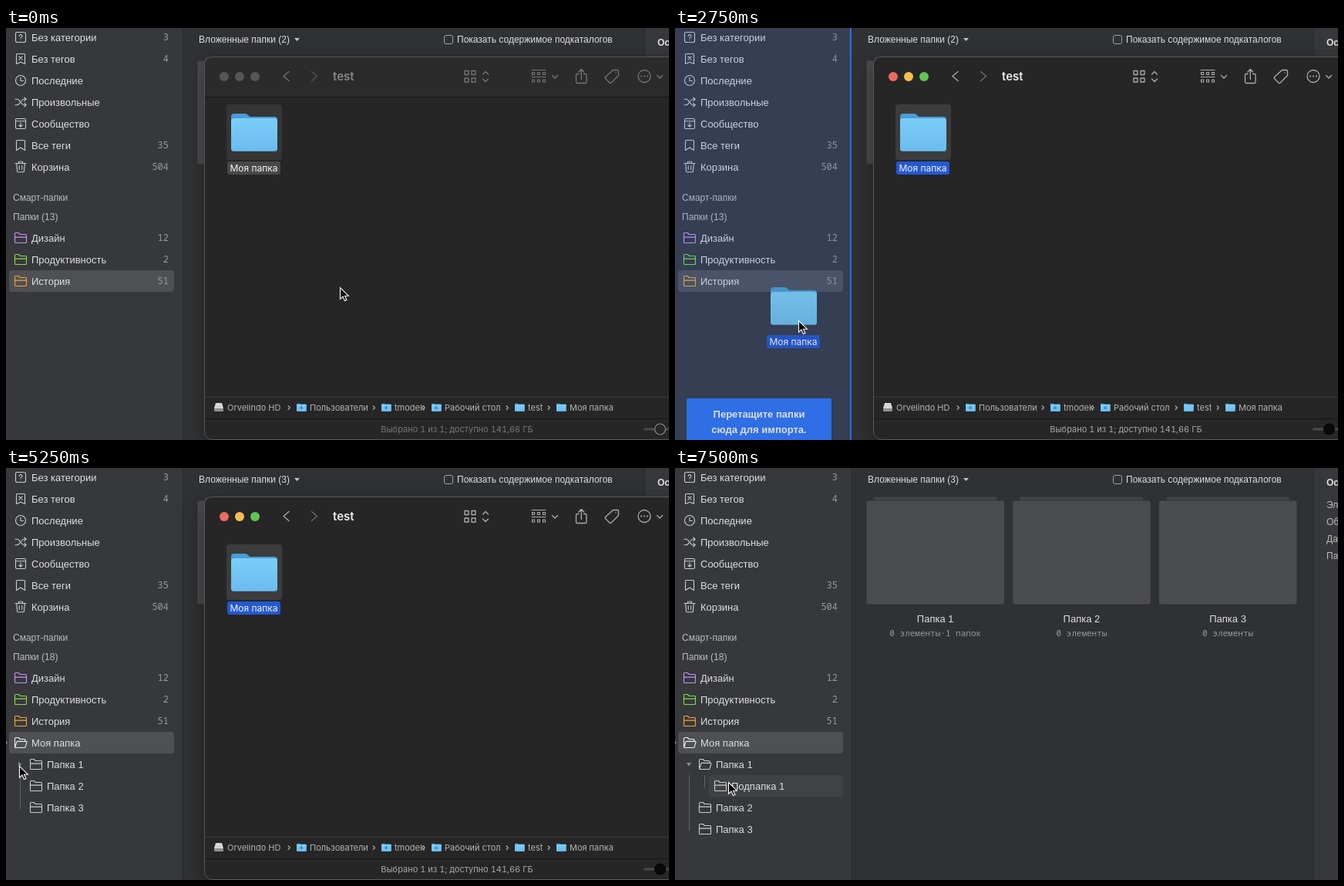
Animation of 860x534 px, one loop 8 s. Source, as an HTML page:

```html
<!DOCTYPE html>
<html lang="ru">
<meta charset="utf-8">
<style>
html, body { margin: 0; width: 100%; height: 100%; overflow: hidden; background: #303133; }
svg { display: block; width: 860px; height: 534px;
  --tool: #adadad; --title: #ececec; --status: #a8a8a8; --label: #2358d1; --square: #3c3c3c;
  --bar: #262626; --rule: #262626; --red: #ed6a5e; --yellow: #f5bf4f; --green: #61c554; --knob: #080808; --ring: #080808; }
svg.idle { --tool: #767676; --title: #858585; --status: #757575; --label: #484848; --square: #353535;
  --bar: #2b2b2b; --rule: #141414; --red: #565656; --yellow: #565656; --green: #565656; --knob: #262626; --ring: #8c8c8c; }
text { font: 13px "Liberation Sans", Arial, sans-serif; fill: #dededf; }
.small { font-size: 12px; }
.dim { fill: #bbbcbe; }
.bold { font-weight: bold; }
.mono { font: 12px "Noto Sans Mono", monospace; fill: #98999c; }
.mid { text-anchor: middle; }
.end { text-anchor: end; }
.mac text { font-family: Inter, sans-serif; font-size: 11px; fill: #b4b4b4; font-variant-numeric: tabular-nums; }
.mac .name { font-size: 12px; fill: #f4f4f4; }
.mac .title { font-size: 15px; font-weight: 600; fill: var(--title); }
.mac .status { fill: var(--status); }
.line { fill: none; stroke: #cbcbcd; stroke-width: 1.1; stroke-linecap: round; stroke-linejoin: round; }
.tool { fill: none; stroke: var(--tool); stroke-width: 1.3; stroke-linecap: round; stroke-linejoin: round; }
#window { filter: drop-shadow(0 10px 14px rgba(0, 0, 0, .4)); }
.idle #window { filter: drop-shadow(0 5px 9px rgba(0, 0, 0, .35)); }
</style>
<svg id="stage" viewBox="0 0 860 534">
  <defs>
    <linearGradient id="front" x2="0" y2="1"><stop stop-color="#7bcdf9"/><stop offset="1" stop-color="#6cbdee"/></linearGradient>
    <g id="macFolder">
      <path d="M0 5a4 4 0 0 1 4-4h14c4 0 4 4 8 4h30a4 4 0 0 1 4 4v12H0z" fill="#4b9cd6"/>
      <rect y="7" width="60" height="43" rx="3.5" fill="#4fa0d6"/>
      <rect y="7" width="60" height="42" rx="3.5" fill="url(#front)"/>
    </g>
    <g id="category"><rect x="-6.5" y="-6.5" width="13" height="13" rx="2"/><path d="M-1.7-1.6a1.8 1.8 0 1 1 2.7 1.5q-1 .5-1 1.4M0 3.2v.1"/></g>
    <g id="untagged"><path d="M-5.5 6.5v-12a1 1 0 0 1 1-1h9a1 1 0 0 1 1 1v12L0 4.2zM-2-3l4 4M2-3l-4 4"/></g>
    <g id="recent"><circle r="6.5"/><path d="M0-3.7V.5H3.4"/></g>
    <g id="random"><path d="M-7-3.7h2.5c3.5 0 5 7.4 9 7.4H7M-7 3.7h2.5c1.5 0 2.6-1.2 3.5-2.6M1-1.2c1-1.5 2-2.5 3.5-2.5H7M4.8-6l2.4 2.3-2.4 2.3M4.8 1.4l2.4 2.3L4.8 6"/></g>
    <g id="community"><rect x="-6.5" y="-6.5" width="13" height="13" rx="1.5"/><path d="M-6.5-3.3h13M0-1.2v5M-2.2 1.8L0 4l2.2-2.2"/></g>
    <g id="tags"><path d="M-5.5 6.5v-12a1 1 0 0 1 1-1h9a1 1 0 0 1 1 1v12L0 3z"/></g>
    <g id="trash"><path d="M-7-4.5H7M-2.5-4.5v-2.3h5v2.3M-5.3-4.5l.8 10a1.2 1.2 0 0 0 1.2 1.2h6.6a1.2 1.2 0 0 0 1.2-1.2l.8-10M-1.8-1.5v5M1.8-1.5v5"/></g>
    <g id="folder"><path d="M-7.5 5.5v-11a1 1 0 0 1 1-1h3.8l2 2h7.2a1 1 0 0 1 1 1v9a1 1 0 0 1-1 1h-13a1 1 0 0 1-1-1zM-7.5-.9h15"/></g>
    <g id="open"><path d="M-7.5 5.5v-11a1 1 0 0 1 1-1h3.8l2 2h5.7a1 1 0 0 1 1 1v2M-7.3 6l2.2-7a1 1 0 0 1 1-.6H7.3a.8.8 0 0 1 .7 1L6.1 5.7a1 1 0 0 1-1 .8H-6.8z"/></g>
  </defs>

  <rect width="860" height="534" fill="#303133"/>
  <rect width="229" height="534" fill="#37383b"/>
  <rect x="829" width="31" height="534" fill="#37383b"/>
  <path d="M229.5 0V534M828.5 0V534" stroke="#292a2c"/>

  <text id="nested" class="small" x="250" y="19"></text>
  <path d="M374 13h7l-3.5 4z" fill="#c4c5c7"/>
  <rect x="568.5" y="9.5" width="11" height="11" rx="2.5" fill="none" stroke="#a0a1a3"/>
  <text class="small" x="585" y="19">Показать содержимое подкаталогов</text>
  <g id="cards"></g>
  <g id="info"></g>

  <rect id="selected" x="4" width="214" height="28" rx="4" fill="#4f5054"/>
  <rect id="hover" height="28" rx="4" fill="#414245"/>
  <g id="list"></g>
  <text class="small dim" x="9" y="224">Смарт-папки</text>
  <text id="total" class="small dim" x="9" y="249"></text>
  <g id="tree">
    <path d="M0 354l2 2-2 2z" fill="#8b8c8e"/>
    <rect id="branch" x="18" y="398" width="1" fill="#626366"/>
    <path id="arrow" d="M-2-3.2L2.5 0-2 3.2z" fill="#8b8c8e"/>
    <g id="closed"></g>
    <g id="expanded"></g>
    <g id="rest"></g>
  </g>

  <g id="drop">
    <rect width="229" height="534" fill="#2e6cf0" opacity=".12"/>
    <rect x="227" width="2" height="534" fill="#316fe6"/>
    <rect x="15" y="480" width="188" height="60" rx="2" fill="#2e6fe6"/>
    <g class="mid" style="font-weight:bold">
      <text class="bold" x="109" y="505">Перетащите папки</text>
      <text class="bold" x="109" y="525">сюда для импорта.</text>
    </g>
  </g>

  <g id="window" class="mac">
    <rect x="257.5" y="37.5" width="660" height="496" rx="10" fill="#262626" stroke="#59595a"/>
    <path d="M258 89V48a10 10 0 0 1 10-10H870V89z" fill="var(--bar)"/>
    <path d="M258 89.5H860" stroke="var(--rule)"/>
    <path d="M258 478.5H860" stroke="#3b3b3b"/>
    <path d="M258 506.5H860" stroke="#161616"/>
    <circle cx="283" cy="63" r="6" fill="var(--red)"/>
    <circle cx="303" cy="63" r="6" fill="var(--yellow)"/>
    <circle cx="323" cy="63" r="6" fill="var(--green)"/>
    <path class="tool" d="M367 56.5l-7 6 7 6"/>
    <path class="tool" d="M396.500 56.500l7 6-7 6" opacity=".55"/>
    <text class="title" x="424" y="68">test</text>
    <g class="tool">
      <path d="M595 55.500h5v5h-5zM604 55.500h5v5h-5zM595 65h5v5h-5zM604 65h5v5h-5z"/>
      <path d="M618.500 60l3.500-3.500 3.500 3.500M618.500 66l3.500 3.500 3.500-3.500M708.500 61.500l3.500 3.500 3.500-3.500M844.500 61.500l3.500 3.500 3.500-3.500"/>
      <path stroke-width="1.1" d="M682 54.500h18M682 63.500h18M682.500 57.500h3v3h-3zM689.500 57.500h3v3h-3zM696.500 57.500h3v3h-3zM682.500 67h3v3h-3zM689.500 67h3v3h-3zM696.500 67h3v3h-3z"/>
      <path d="M743 59.500h-2a1.500 1.500 0 0 0-1.500 1.500v9a1.500 1.500 0 0 0 1.500 1.500h10.500a1.500 1.500 0 0 0 1.500-1.500v-9a1.500 1.500 0 0 0-1.500-1.500h-2M746.300 66.500v-13M742.800 57l3.500-3.500 3.500 3.500"/>
      <path d="M787.500 54.500h5.500a1.500 1.500 0 0 1 1.500 1.500v5.500L785 71a1.500 1.500 0 0 1-2 0l-5.500-5.500a1.500 1.500 0 0 1 0-2zM791 58v.1"/>
      <circle cx="828" cy="62.500" r="8"/>
      <path stroke-width="2" d="M824 62.500h.1M828 62.500h.1M832 62.500h.1"/>
    </g>
    <rect x="286" y="99" width="72" height="72" rx="4" fill="var(--square)"/>
    <g id="item" class="mac">
      <use href="#macFolder" x="292" y="110"/>
      <rect x="287" y="173" width="69" height="17" rx="3" fill="var(--label)"/>
      <text class="name mid" x="321.5" y="186">Моя папка</text>
    </g>
    <path d="M272 486h8l2 7h-12z" fill="#d6d6d6"/>
    <rect x="270" y="493" width="12" height="4" rx="1" fill="#8f8f8f"/>
    <g id="path"></g>
    <text class="status mid" x="585" y="524">Выбрано 1 из 1; доступно 141,66 ГБ</text>
    <path d="M828.500 520H860" stroke="#4b4b4b" stroke-width="3" stroke-linecap="round"/>
    <circle cx="848.500" cy="520" r="7" fill="var(--knob)" stroke="var(--ring)" stroke-width="1.2"/>
  </g>

  <use id="ghost" href="#item" opacity=".9"/>
  <path id="cursor" d="M.5 .5V15.300L4 12 6.400 17.600 8.900 16.500 6.500 11.200H11.300Z" fill="#000" stroke="#fff" stroke-width="1.1"/>
</svg>
<script>
const $ = id => document.getElementById(id);
const show = (id, on) => $(id).style.display = on ? '' : 'none';
const move = (id, x, y, extra = '') => $(id).setAttribute('transform', `translate(${x} ${y}) ${extra}`);

const row = (x, y, icon, label, count = '', color = '#cbcbcd') =>
  `<use href="#${icon}" class="line" x="${x}" y="${y}" style="stroke:${color}"/>
   <text x="${x + 14}" y="${y + 5}">${label}</text>
   <text class="mono end" x="211" y="${y + 4}">${count}</text>`;

$('list').innerHTML = [
  ['category', 'Без категории', 3], ['untagged', 'Без тегов', 4], ['recent', 'Последние'],
  ['random', 'Произвольные'], ['community', 'Сообщество'], ['tags', 'Все теги', 35], ['trash', 'Корзина', 504]
].map((r, i) => row(19, 12 + 28 * i, ...r)).join('') + [
  ['folder', 'Дизайн', 12, '#c793f5'], ['folder', 'Продуктивность', 2, '#84dc4c'], ['folder', 'История', 51, '#f3a638']
].map((r, i) => row(19, 272 + 28 * i, ...r)).join('');

$('closed').innerHTML = row(39, 384, 'folder', 'Папка 1');
$('expanded').innerHTML = row(39, 384, 'open', 'Папка 1') + row(59, 412, 'folder', 'Подпапка 1') +
  '<rect x="38" y="398" width="1" height="16" fill="#626366"/>';
$('rest').innerHTML = row(39, 412, 'folder', 'Папка 2') + row(39, 440, 'folder', 'Папка 3');
$('tree').insertAdjacentHTML('beforeend', row(19, 356, 'open', 'Моя папка', '', '#eee'));

$('cards').innerHTML = ['0 элементы·1 папок', '0 элементы', '0 элементы'].map((note, i) => {
  const x = 248 + 189.7 * i;
  return `<rect x="${x + 10}" y="37.5" width="159.5" height="8" rx="2" fill="#424346"/>
    <rect x="${x}" y="42" width="179.5" height="135" rx="3" fill="#4a4b4e" stroke="#2a2b2d" stroke-width=".6"/>
    <text class="mid" x="${x + 89.7}" y="200">Папка ${i + 1}</text>
    <text class="mono mid" style="font-size:11px" x="${x + 89.7}" y="218">${note}</text>`;
}).join('');

$('info').innerHTML = '<text class="small bold" x="845" y="23">Ос</text>' +
  ['Эл', 'Об', 'Да', 'Па'].map((s, i) => `<text class="small dim" x="845" y="${52 + 22 * i}">${s}</text>`).join('');

$('path').innerHTML = [
  [270, 'Orvelindo HD', 367], [377, 'Пользователи', 477], [487, 'tmodek', 542],
  [552, 'Рабочий стол', 650], [660, 'test', 704], [714, 'Моя папка']
].map(([x, label, chevron], i) =>
  (i ? `<use href="#macFolder" transform="translate(${x} 486.5) scale(.21)"/>` : '') +
  (i && i < 4 ? `<rect x="${x + 4.5}" y="490.5" width="3.5" height="3.5" rx="1" fill="#3f8fc8"/>` : '') +
  `<text x="${x + 17}" y="496">${label}</text>` +
  (chevron ? `<path d="M${chevron - 1.2} 489.5l2.6 2.7-2.6 2.7" fill="none" stroke="#adadad" stroke-width="1.2"/>` : '')
).join('');

// Cursor stops: time, x, y
const stops = [
  [0, 433, 336], [500, 432, 334], [750, 349, 190], [1000, 328, 157], [1250, 328, 154], [2250, 328, 153],
  [2500, 263, 251], [2750, 160, 379], [3000, 115, 421], [3250, 115, 420], [4250, 65, 403], [4500, 28, 345],
  [4750, 20, 382], [5000, 20, 386], [5250, 17, 386], [5500, 16, 386], [6000, 18, 386], [6250, 18, 388],
  [6500, 16, 387], [7000, 16, 388], [7250, 115, 403], [7500, 69, 407]
];

function draw(now) {
  const t = now % 8000;
  const within = (from, to = 8000) => t >= from && t < to;
  const [, x, y] = stops.findLast(s => s[0] <= t);
  const imported = within(3500), expanded = within(6500), inner = within(7500);

  move('cursor', x, y);
  move('ghost', x - 328, y - 154);
  show('ghost', within(2500, 3250));
  show('drop', within(2750, 3250));
  show('window', t < 5500);
  $('stage').classList.toggle('idle', t < 1500);

  $('nested').textContent = `Вложенные папки (${imported ? 3 : 2})`;
  $('total').textContent = `Папки (${imported ? 18 : 13})`;
  $('selected').setAttribute('y', imported ? 342 : 314);

  show('tree', imported);
  show('closed', !expanded);
  show('expanded', expanded);
  move('rest', 0, expanded ? 28 : 0);
  move('arrow', 18, 384, `rotate(${within(6750) ? 90 : expanded ? 45 : 0})`);
  $('branch').setAttribute('height', expanded ? 72 : 44);

  show('hover', within(6000));
  $('hover').setAttribute('x', inner ? 44 : 24);
  $('hover').setAttribute('y', inner ? 398 : 370);
  $('hover').setAttribute('width', inner ? 174 : 194);

  requestAnimationFrame(draw);
}
const start = performance.now();
requestAnimationFrame(() => draw(0));
draw = (step => () => step(performance.now() - start))(draw);
</script>
</html>
```
